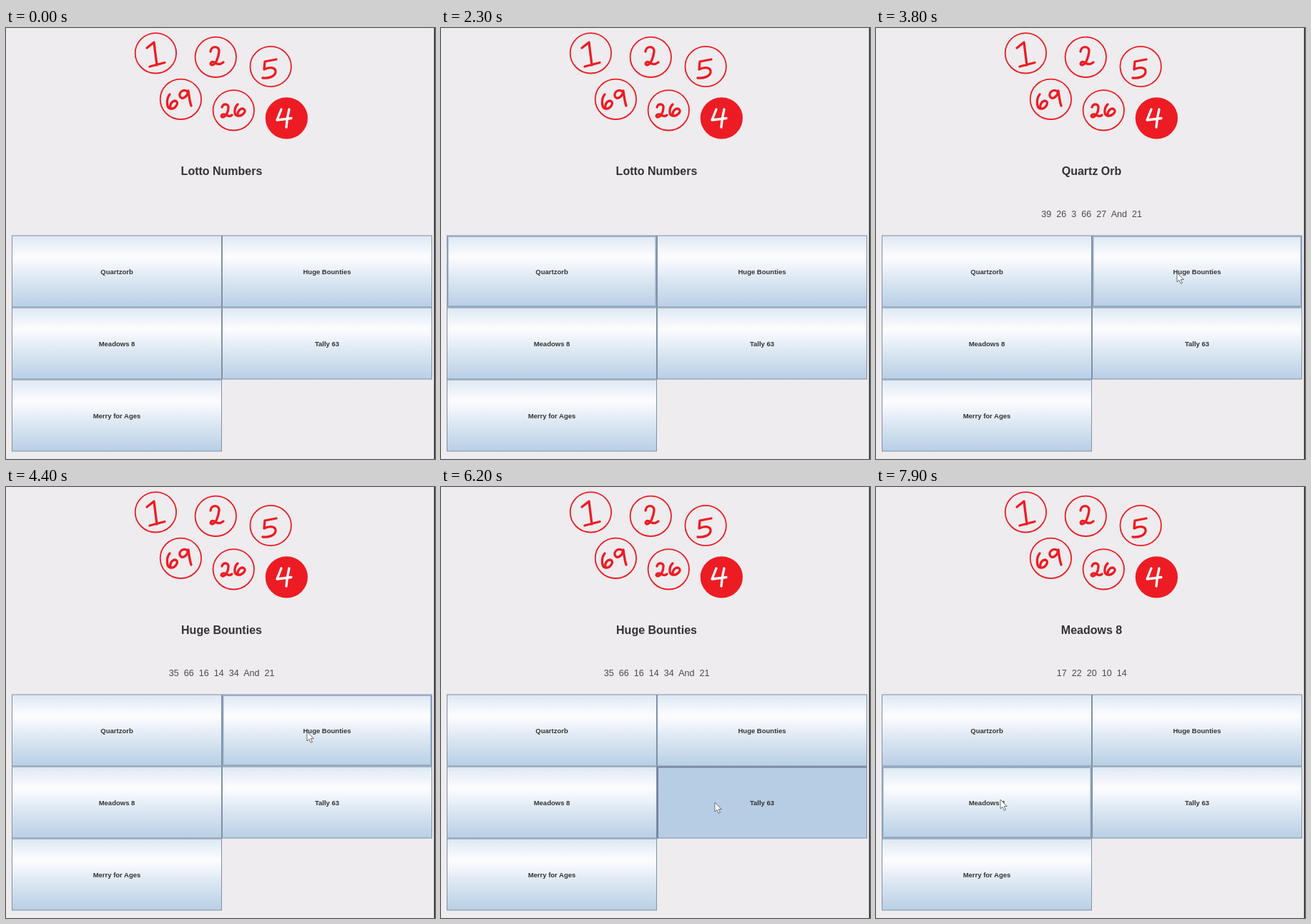
These frames come from a looping animation (600x604 px, 8 s). An HTML page:

```html
<!DOCTYPE html>
<html lang="en">
<head>
<meta charset="utf-8">
<title>Lotto Numbers</title>
<style>
  html, body { margin: 0; width: 100%; height: 100%; overflow: hidden; background: #eeecee; }
  svg { display: block; width: 600px; height: 604px; }
  text { font-family: "Liberation Sans", Arial, sans-serif; text-anchor: middle; fill: #333; white-space: pre; }
  .label { font-size: 9.5px; font-weight: bold; }
  #heading { font-size: 16px; font-weight: bold; }
  #numbers { font-size: 12.6px; fill: #4a4a4a; }
  .ink { fill: none; stroke: #ed1c24; stroke-linecap: round; stroke-linejoin: round; }
  .digits { stroke-width: 3.3; }
  .balls { stroke-width: 1.8; }
  .balls ellipse { rx: 28.7px; ry: 28.2px; }
  .ring { fill: none; stroke: #93abc9; stroke-width: 1.6; }
  .sunken { fill: none; stroke: #74849a; stroke-width: 2; }
</style>
</head>
<body>
<svg viewBox="0 0 600 604">
  <defs>
    <linearGradient id="metal" x2="0" y2="1">
      <stop offset="0" stop-color="#dde8f3"/>
      <stop offset=".3" stop-color="#fdfdff"/>
      <stop offset=".6" stop-color="#dde8f3"/>
      <stop offset="1" stop-color="#b8cfe5"/>
    </linearGradient>
  </defs>
  <rect width="600" height="604" fill="#eeecee"/>
  <rect x="598.7" width="1.3" height="604" fill="#1c1c1e"/>

  <g class="ink balls">
    <ellipse cx="209.4" cy="35.3"/>
    <ellipse cx="293.3" cy="40.8"/>
    <ellipse cx="370.2" cy="54"/>
    <ellipse cx="244.4" cy="99.8"/>
    <ellipse cx="318.3" cy="115.3"/>
    <ellipse cx="392.4" cy="126.3" fill="#ed1c24"/>
  </g>
  <g class="ink digits">
    <path d="M197 28L207 20Q209 37 211 52M201 54L222 48.5"/>
    <path d="M286 33C287 24 299 25 298 33C297 42 293 52 288 52C284 51 287 46 291 48C296 51 299 52 304 48"/>
    <path d="M378 44L362 47L361 58C369 54 378 55 377 62C376 68 367 71 359 70"/>
    <path d="M229 93C224 99 224 112 230 113C237 114 243 104 237 102C232 102 229 107 230 112"/>
    <path d="M255 91C252 84 242 88 243 95C245 102 254 97 255 88C256 96 257 103 259 109"/>
    <path d="M302 111C304 105 312 106 311 112C311 118 307 125 303 125C299 124 302 120 306 121C310 123 313 125 316 122"/>
    <path d="M324 107C319 112 318 122 324 123C330 124 337 117 333 114C329 111 324 116 324 121"/>
    <path d="M385 114L379 129L399 126.5M396 114Q393 126 392 139" stroke="#fff"/>
  </g>

  <text id="heading" x="301.5" y="206.4"></text>
  <text id="numbers" x="301.7" y="265.3"></text>
  <g id="buttons"></g>
  <path id="cursor" d="M0 0V13L3 10.3L5.2 15.3L7.4 14.3L5.2 9.5H9.3Z" fill="#fff" stroke="#4a4d54" stroke-width=".8"/>
</svg>
<script>
const LOOP = 8000, STEP = 100;
const WIDTH = 294, HEIGHT = 101, LEFT = 8, TOP = 290.5;
const byId = id => document.getElementById(id);

const buttons = ["Quartzorb", "Huge Bounties", "Meadows 8", "Tally 63", "Merry for Ages"]
  .map((label, i) => ({ label, x: LEFT + i % 2 * WIDTH, y: TOP + Math.floor(i / 2) * HEIGHT }));

// Each press lasts until the release, which shows the draw.
const clicks = [
  { button: 0, down: 2600, up: 2800, heading: "Quartz Orb", numbers: "39  26  3  66  27  And  21" },
  { button: 1, down: 4100, up: 4300, heading: "Huge Bounties", numbers: "35  66  16  14  34  And  21" },
  { button: 3, down: 6200, up: 6400, heading: "Tally 63", numbers: "38  18  19  6  14  23" },
  { button: 2, down: 7800, up: 7900, heading: "Meadows 8", numbers: "17  22  20  10  14" },
];

// Pointer stops: time, x, y
const stops = [
  [1200, 340, 250], [1600, 170, 343], [3000, 170, 343], [3500, 421, 343],
  [5400, 421, 343], [5800, 383, 442], [6800, 383, 442], [7400, 174, 438],
];
const CURSOR_SHOWN = 2800;

byId("buttons").innerHTML = buttons.map(({ label, x, y }) => `
  <g transform="translate(${x} ${y})">
    <rect class="face" x=".5" y=".5" width="${WIDTH - 1}" height="${HEIGHT - 1}" stroke="#8090a5"/>
    <rect class="ring" x="1.7" y="1.7" width="${WIDTH - 3.4}" height="${HEIGHT - 3.4}"/>
    <path class="sunken" d="M1 ${HEIGHT}V1H${WIDTH}"/>
    <text class="label" x="${WIDTH / 2}" y="${HEIGHT / 2 + 4}">${label}</text>
  </g>`).join("");
const views = [...byId("buttons").children].map(group => ({
  face: group.querySelector(".face"),
  ring: group.querySelector(".ring"),
  sunken: group.querySelector(".sunken"),
}));

function pointerAt(t) {
  const next = stops.findIndex(stop => stop[0] > t);
  if (next <= 0) return (next ? stops.at(-1) : stops[0]).slice(1);
  const [t0, x0, y0] = stops[next - 1], [t1, x1, y1] = stops[next];
  const p = (t - t0) / (t1 - t0), eased = p * p * (3 - 2 * p);
  return [x0 + (x1 - x0) * eased, y0 + (y1 - y0) * eased];
}

const show = (element, visible) => element.setAttribute("visibility", visible ? "visible" : "hidden");

function draw(t) {
  const [px, py] = pointerAt(t);
  const latest = clicks.filter(click => t >= click.up).at(-1) || { heading: "Lotto Numbers", numbers: "" };
  const press = clicks.find(click => t >= click.down && t < click.up);

  byId("heading").textContent = latest.heading;
  byId("numbers").textContent = latest.numbers;
  buttons.forEach(({ x, y }, i) => {
    const pressed = press?.button === i;
    const hovered = px >= x && px < x + WIDTH && py >= y && py < y + HEIGHT;
    views[i].face.setAttribute("fill", pressed ? "#b7cde4" : "url(#metal)");
    show(views[i].ring, hovered && !pressed);
    show(views[i].sunken, pressed);
  });
  byId("cursor").setAttribute("transform", `translate(${px} ${py})`);
  show(byId("cursor"), t >= CURSOR_SHOWN);
}

function tick() {
  draw(Math.floor(performance.now() % LOOP / STEP) * STEP);
  requestAnimationFrame(tick);
}
tick();
</script>
</body>
</html>
```
